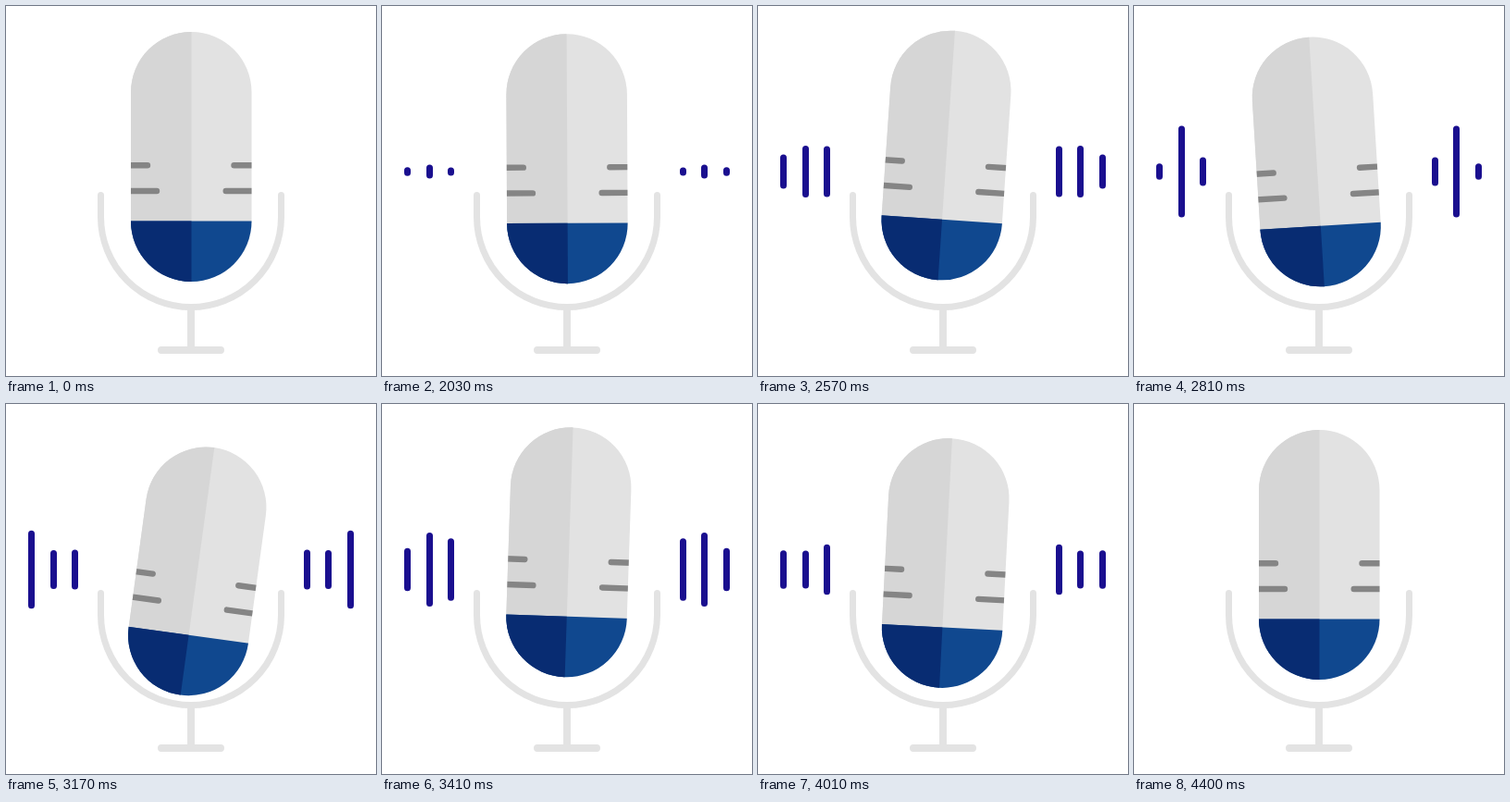
Write an HTML page that moves like this. It is 400x400 px and loops after 4430 ms.

```html
<!DOCTYPE html>
<html lang="en">
<head>
<meta charset="utf-8">
<title>Microphone</title>
<style>
  html, body { margin: 0; width: 100%; height: 100%; overflow: hidden; background: #fff; }
  svg { display: block; width: 100%; height: 100%; }
  path { fill: none; stroke-linecap: round; }
</style>
</head>
<body>
<svg viewBox="0 0 400 400">
  <clipPath id="body"><rect x="135" y="28" width="130.5" height="270" rx="65.2"/></clipPath>
  <g stroke="#e3e3e3">
    <path stroke-width="7" d="M102.5 204.5V228a97.5 97.5 0 0 0 195 0V204.5"/>
    <path stroke-width="8" d="M200 327V372M168 372H232"/>
  </g>
  <g id="mic">
    <g clip-path="url(#body)">
      <rect x="130" y="20" width="140" height="290" fill="#e2e2e2"/>
      <rect x="130" y="20" width="70.5" height="290" fill="#d6d6d6"/>
      <rect x="130" y="232.5" width="140" height="80" fill="#10488f"/>
      <rect x="130" y="232.5" width="70.5" height="80" fill="#082c72"/>
      <path stroke="#858585" stroke-width="6.4" d="M120 172.2H153M120 200H163M280 172.2H246.5M280 200H237.7"/>
    </g>
  </g>
  <g id="bars" stroke="#1a0f8f" stroke-width="7"></g>
</svg>
<script>
const LOOP = 4430, START = 2030, END = 4400, STEP = 30;

// Keyframes as [ms, value], eased in and out between neighbours.
const drop = [[1950, 0], [2330, 21], [2630, -4], [3060, 21], [3530, -7], [3980, 9], [4400, 0]];
const tilt = [[2000, 0], [2150, -3], [2420, 8], [2790, -3.6], [3160, 7.8], [3660, -4], [4030, 3], [4400, 0]];
const waves = [
  { x: 27.5, keys: [[1960, 7], [2420, 48], [2790, 17], [3190, 85], [3440, 45], [3690, 86], [4050, 40], [4400, 7]] },
  { x: 51.5, keys: [[1950, 7], [2370, 97], [2590, 55], [2820, 99], [3160, 42], [3420, 80], [3680, 67], [4400, 7]] },
  { x: 74.5, keys: [[1950, 7], [2380, 32], [2580, 55], [2800, 31], [3030, 60], [3180, 43], [3660, 95], [4400, 7]] }
];

function valueAt(keys, t) {
  const i = Math.max(1, keys.findIndex(key => key[0] >= t));
  const [t0, a] = keys[i - 1], [t1, b] = keys[i];
  const p = Math.min(1, Math.max(0, (t - t0) / (t1 - t0)));
  return a + (b - a) * (1 - Math.cos(Math.PI * p)) / 2;
}

const mic = document.getElementById("mic");
const bars = document.getElementById("bars");
for (const wave of waves) {
  wave.path = document.createElementNS("http://www.w3.org/2000/svg", "path");
  bars.append(wave.path);
}

function draw(now) {
  const time = now % LOOP;
  const t = START + Math.floor((time - START) / STEP) * STEP;
  const active = t >= START && t < END;
  bars.style.display = active ? "" : "none";
  mic.setAttribute("transform", active
    ? `translate(0 ${valueAt(drop, t)}) rotate(${valueAt(tilt, t)} 200 211)`
    : "");
  for (const { x, keys, path } of waves) {
    const half = Math.max(0, valueAt(keys, t) - 7) / 2;
    const span = `${179 - half}V${179 + half}`;
    path.setAttribute("d", `M${x} ${span}M${400 - x} ${span}`);
  }
  requestAnimationFrame(() => draw(performance.now()));
}
draw(0);
</script>
</body>
</html>
```
